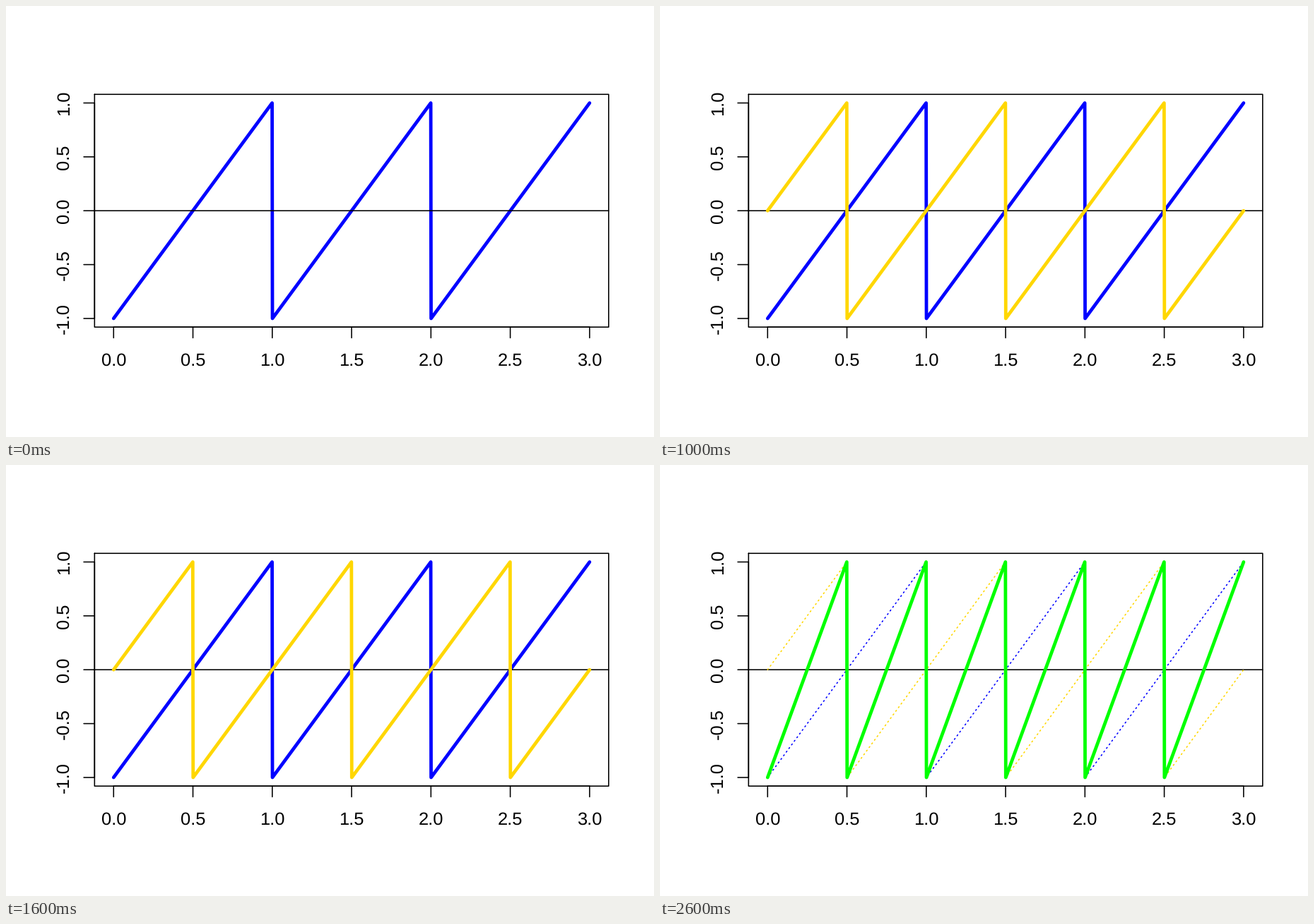
Write a matplotlib script that moves like this. It is 917 px wide and 611 px high and loops after 3 s.

```python
import matplotlib.pyplot as plt
from matplotlib.animation import FuncAnimation

plt.rcParams["font.family"] = "Liberation Sans"
plt.rcParams["text.hinting"] = "none"
plt.rcParams["path.snap"] = False

W, H, DPI = 917, 611, 64
SCALE = W / 900                      # layout is laid out on a 900 x 600 page
LEFT, RIGHT, TOP, BOTTOM = 123, 837, 123, 447
TICK = 15
JUMP = 0.002                         # width of the steep falling edge


def pt(units):
    """Page units to points."""
    return units * SCALE * 72 / DPI


def px(t):
    return LEFT + (RIGHT - LEFT) * (t + 0.12) / 3.24


def py(v):
    return BOTTOM - (BOTTOM - TOP) * (v + 1.08) / 2.16


THIN, THICK = pt(150 / 96), pt(3 * 150 / 96)

fig = plt.figure(figsize=(W / DPI, H / DPI), dpi=DPI, facecolor="white")
ax = fig.add_axes([0, 0, 1, 1])
ax.set_xlim(0, 900)
ax.set_ylim(600, 0)
ax.axis("off")


def stroke(xs, ys, color="black", width=THIN, **style):
    line, = ax.plot(xs, ys, color=color, lw=width, solid_capstyle="round",
                    solid_joinstyle="round", dash_capstyle="round",
                    dash_joinstyle="round", **style)
    return line


def sawtooth(period, start):
    """Corner points of a wave rising from -1 to 1, first value given."""
    ts, vs = [0], [start]
    peak = period * (1 - start) / 2
    while peak < 3 - 1e-9:
        ts += [peak - JUMP / 2, peak + JUMP / 2]
        vs += [1, -1]
        peak += period
    ts.append(3)
    vs.append(1 - 2 * (peak - 3) / period)
    return [px(t) for t in ts], [py(v) for v in vs]


def wave(period, start, color, z, dotted=False):
    if dotted:
        return stroke(*sawtooth(period, start), color, THIN, zorder=z,
                      linestyle=(0, (1, 3)))
    return stroke(*sawtooth(period, start), color, THICK, zorder=z)


# Frame, zero line and axes
stroke([LEFT, RIGHT, RIGHT, LEFT, LEFT], [TOP, TOP, BOTTOM, BOTTOM, TOP], zorder=2)
stroke([LEFT, RIGHT], [py(0)] * 2, zorder=2)
stroke([px(0), px(3)], [BOTTOM] * 2, zorder=2)
stroke([LEFT] * 2, [py(-1), py(1)], zorder=2)

label = dict(fontsize=pt(25), ha="center", va="baseline",
             rotation_mode="anchor", color="black")
for i in range(7):
    t = i / 2
    stroke([px(t)] * 2, [BOTTOM, BOTTOM + TICK], zorder=2)
    ax.text(px(t), BOTTOM + 54, f"{t:.1f}", **label)
for i in range(-2, 3):
    v = i / 2
    stroke([LEFT - TICK, LEFT], [py(v)] * 2, zorder=2)
    ax.text(LEFT - 36, py(v), f"{v:.1f}", rotation=90, **label)

# Each wave with the steps in which it is shown
waves = [
    (wave(1, -1, "#0000ff", 1), (0, 1)),
    (wave(1, 0, "#ffd700", 3), (1,)),
    (wave(1, -1, "#0000ff", 1, dotted=True), (2,)),
    (wave(1, 0, "#ffd700", 3, dotted=True), (2,)),
    (wave(0.5, -1, "#00ff00", 4), (2,)),
]


def update(step):
    for line, steps in waves:
        line.set_visible(step in steps)
    return [line for line, _ in waves]


anim = FuncAnimation(fig, update, frames=3, interval=1000, repeat=True,
                     repeat_delay=0, blit=False)
plt.show()
```
